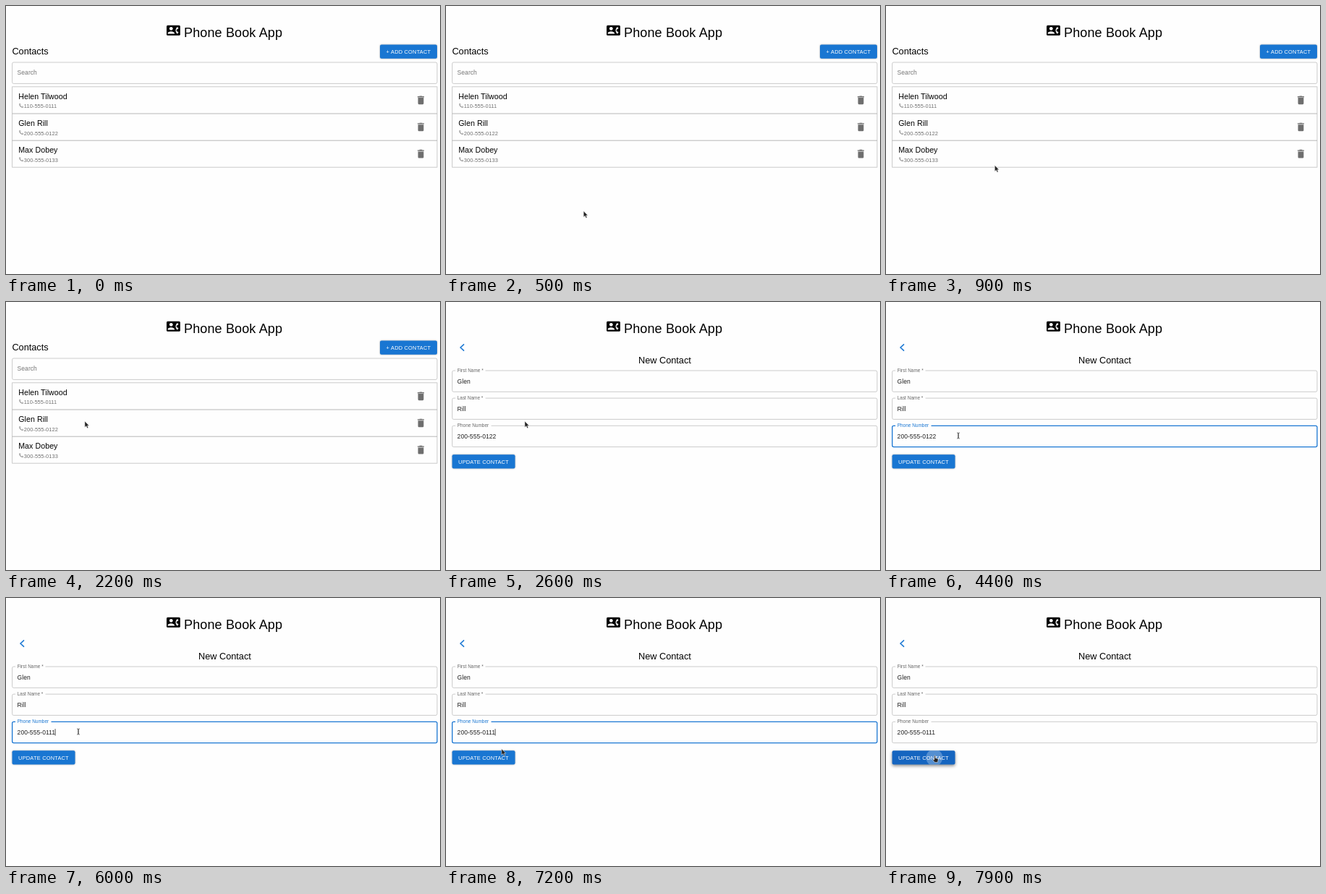
Recreate the animation shown at these times as an HTML page. Size 600 by 371 pixels, loop 8 s.

```html
<!DOCTYPE html>
<html lang="en">
<head>
<meta charset="utf-8">
<title>Phone Book App</title>
<style>
html, body { margin: 0; width: 100%; height: 100%; overflow: hidden; background: #fefefe; }
svg { display: block; width: 600px; height: 371px; font-family: "Liberation Sans", Arial, sans-serif; }
text { fill: #000; white-space: pre; }
.title { font-size: 18.02px; letter-spacing: .00735em; }
.h5 { font-size: 12.72px; }
.h6 { font-size: 10.6px; letter-spacing: .0075em; }
.body { font-size: 8.48px; letter-spacing: .00938em; fill: #212121; }
.small { font-size: 7.42px; letter-spacing: .01071em; fill: #707070; }
.label { font-size: 6.36px; letter-spacing: .00938em; fill: #666; }
.btn { font-size: 7.42px; letter-spacing: .02857em; fill: #fff; }
.line { fill: none; stroke: #c2c2c2; stroke-width: .85; }
.hover .line { stroke: #3a3a3a; }
.focus .line { stroke: #1976d2; stroke-width: 1.3; }
.focus .label { fill: #1976d2; }
.face { fill: #1976d2; filter: drop-shadow(0 .9px .9px rgba(0,0,0,.32)); }
.hot .face { fill: #1565c0; filter: drop-shadow(0 1.2px 1.3px rgba(0,0,0,.4)); }
.down .face { filter: drop-shadow(0 2px 2px rgba(0,0,0,.45)); }
</style>
</head>
<body>
<svg id="stage" viewBox="0 0 600 371"></svg>
<script>
const LOOP = 8000, STEP = 100;
const contacts = [
  ["Helen Tilwood", "110-555-0111"],
  ["Glen Rill", "200-555-0122"],
  ["Max Dobey", "300-555-0133"]
];
const oldPhone = contacts[1][1];
const newPhone = oldPhone.slice(0, -2) + "11";

const text = (cls, x, y, s, extra = "") => `<text class="${cls}" x="${x}" y="${y}" ${extra}>${s}</text>`;

const button = (id, x, y, w, s) => `<g id="${id}">
  <rect class="face" x="${x}" y="${y}" width="${w}" height="19.4" rx="2.1"/>
  ${text("btn", x + 8.6, y + 12.3, s)}</g>`;

const headIcon = `<g transform="translate(222 24.3) scale(.785)">
  <rect y="3" width="24" height="18" rx="2"/>
  <g fill="#fefefe"><circle cx="8" cy="9" r="3"/>
  <path d="M2 18v-1c0-2 4-3.1 6-3.1s6 1.1 6 3.1v1z"/>
  <path d="M17.85 14h1.64L21 16l-2 2c-4-3-4-9 0-12L21 8l-1.5 2h-1.65q-.7 2 0 4z"/></g></g>`;

const handset = y => `<path transform="translate(17.2 ${y}) scale(.315)" fill="none" stroke="#777"
  stroke-width="2" d="M4 4h4l1 4-2.5 2.5c1.5 3 4 5.5 7 7L16 15l4 1v4C11 20 4 13 4 4z"/>`;

const bin = y => `<path transform="translate(565.7 ${y}) scale(.65)" fill="#6e6e6e"
  d="M6 19q0 2 2 2h8q2 0 2-2V7H6zM19 4h-3.5l-1-1h-5l-1 1H5v2h14z"/>`;

const row = ([name, phone], i) => {
  const y = 111.8 + i * 37.2;
  return text("h6", 17.2, y + 16.9, name) + handset(y + 22.4) +
    text("small", 24.8, y + 29.5, phone) + bin(y + 10.7) +
    (i ? `<path class="line" style="stroke:#aaa" d="M8.5 ${y}H596"/>` : "");
};

// Outlined input whose top edge is interrupted by its label
const field = (id, y, label, end, value) => `<g id="${id}">
  <path class="line" d="M${end} ${y}H594a2 2 0 0 1 2 2v25.3a2 2 0 0 1-2 2H10.6a2 2 0 0 1-2-2V${y + 2}a2 2 0 0 1 2-2H13"/>
  ${text("label", 15.7, y + 1.9, label)}
  ${text("body", 15.6, y + 17.8, value)}</g>`;

const stage = document.getElementById("stage");
stage.innerHTML = `
  <clipPath id="clip"><rect x="8.5" y="211.2" width="87" height="19.4" rx="2.1"/></clipPath>
  ${headIcon}${text("title", 246, 43, "Phone Book App")}
  <g id="list">
    ${text("h5", 8.4, 67.2, "Contacts")}
    ${button("add", 517, 53.4, 79, "+ ADD CONTACT")}
    <rect class="line" x="8.6" y="78" width="587.4" height="29.4" rx="2"/>
    ${text("body", 15.6, 95.3, "Search", 'style="fill:#757575"')}
    <rect class="line" x="8.6" y="111.8" width="587.4" height="111.4"/>
    ${contacts.map(row).join("")}
  </g>
  <g id="form">
    <path d="M25 58.4L20 63l5 4.6" fill="none" stroke="#1976d2" stroke-width="1.5"/>
    ${text("h5", 302.4, 85.2, "New Contact", 'text-anchor="middle"')}
    ${field("first", 95, "First Name *", 54.5, contacts[1][0].split(" ")[0])}
    ${field("last", 133.1, "Last Name *", 54.5, contacts[1][0].split(" ")[1])}
    ${field("phone", 171.3, "Phone Number", 62.5, oldPhone)}
    <path id="caret" stroke="#000" stroke-width=".7"/>
    ${button("update", 8.5, 211.2, 87, "UPDATE CONTACT")}
    <circle id="ripple" cx="66.8" cy="221" fill="#fff" opacity=".27" clip-path="url(#clip)"/>
  </g>
  <g id="arrow"><path d="M0 0V8.5L2 6.7 3.4 9.8 4.9 9.1 3.5 6.2H6z" fill="#222" stroke="#fff" stroke-width=".5"/></g>
  <g id="beam"><path d="M-1.8-4q1.8 0 1.8 1V3q0 1-1.8 1M1.8-4Q0-4 0-3V3q0 1 1.8 1" fill="none" stroke="#333" stroke-width=".8"/></g>
  <g id="hand"><path d="M-.7 0q.8-.9 1.5 0V3.2l3.2.9q.8.3.6 1.2L4 9H-.2L-2.8 5.6q.3-1.2 2.1 0z" fill="#222" stroke="#fff" stroke-width=".5"/></g>`;

const $ = id => document.getElementById(id);
const show = (id, on) => { $(id).style.display = on ? "" : "none"; };
const phoneText = $("phone").querySelector(".body");

// Pointer legs: start time, end time, from, to
const legs = [
  [100, 900, [230, 347], [150.3, 220.5]],
  [900, 1500, [150.3, 220.5], [108.9, 165]],
  [3000, 3500, [108.9, 165], [100, 185]],
  [6700, 7400, [100, 185], [67.5, 218.4]]
];

function pointer(t) {
  let p = legs[0][2];
  for (const [t0, t1, a, b] of legs) {
    if (t < t0) break;
    const k = Math.min(1, (t - t0) / (t1 - t0));
    p = a.map((v, i) => v + (b[i] - v) * k);
  }
  return p;
}

function typed(t) {
  if (t < 5100) return oldPhone;
  if (t < 5400) return oldPhone.slice(0, -1);
  if (t < 5700) return oldPhone.slice(0, -2);
  return newPhone.slice(0, t < 6000 ? -1 : undefined);
}

const within = (t, ...spans) => spans.some(([a, b]) => t >= a && t < b);

function draw(t) {
  const form = t >= 2500, focus = within(t, [3800, 7800]);
  const [x, y] = pointer(t);
  const inField = form && y > 171 && y < 201;
  const inButton = form && y > 211;

  show("list", !form);
  show("form", form);
  $("phone").setAttribute("class", focus ? "focus" : inField ? "hover" : "");
  phoneText.textContent = typed(t);
  show("caret", within(t, [3800, 4400], [5000, 6600], [7100, 7800]));
  if (form) {
    const cx = 15.6 + phoneText.getComputedTextLength();
    $("caret").setAttribute("d", `M${cx} 181.2v9.4`);
  }
  $("update").setAttribute("class", t >= 7800 ? "hot down" : inButton ? "hot" : "");
  show("ripple", t >= 7800);
  $("ripple").setAttribute("r", t < 7900 ? 6 : 11.5);

  const kind = t < 100 ? "" : inButton ? "hand" : inField ? "beam" : "arrow";
  for (const id of ["arrow", "beam", "hand"]) show(id, id === kind);
  if (kind) $(kind).setAttribute("transform", `translate(${x} ${y})`);
}

const start = performance.now();
function tick() {
  const t = (performance.now() - start) % LOOP;
  draw(Math.floor(t / STEP) * STEP);
  requestAnimationFrame(tick);
}
tick();
</script>
</body>
</html>
```
